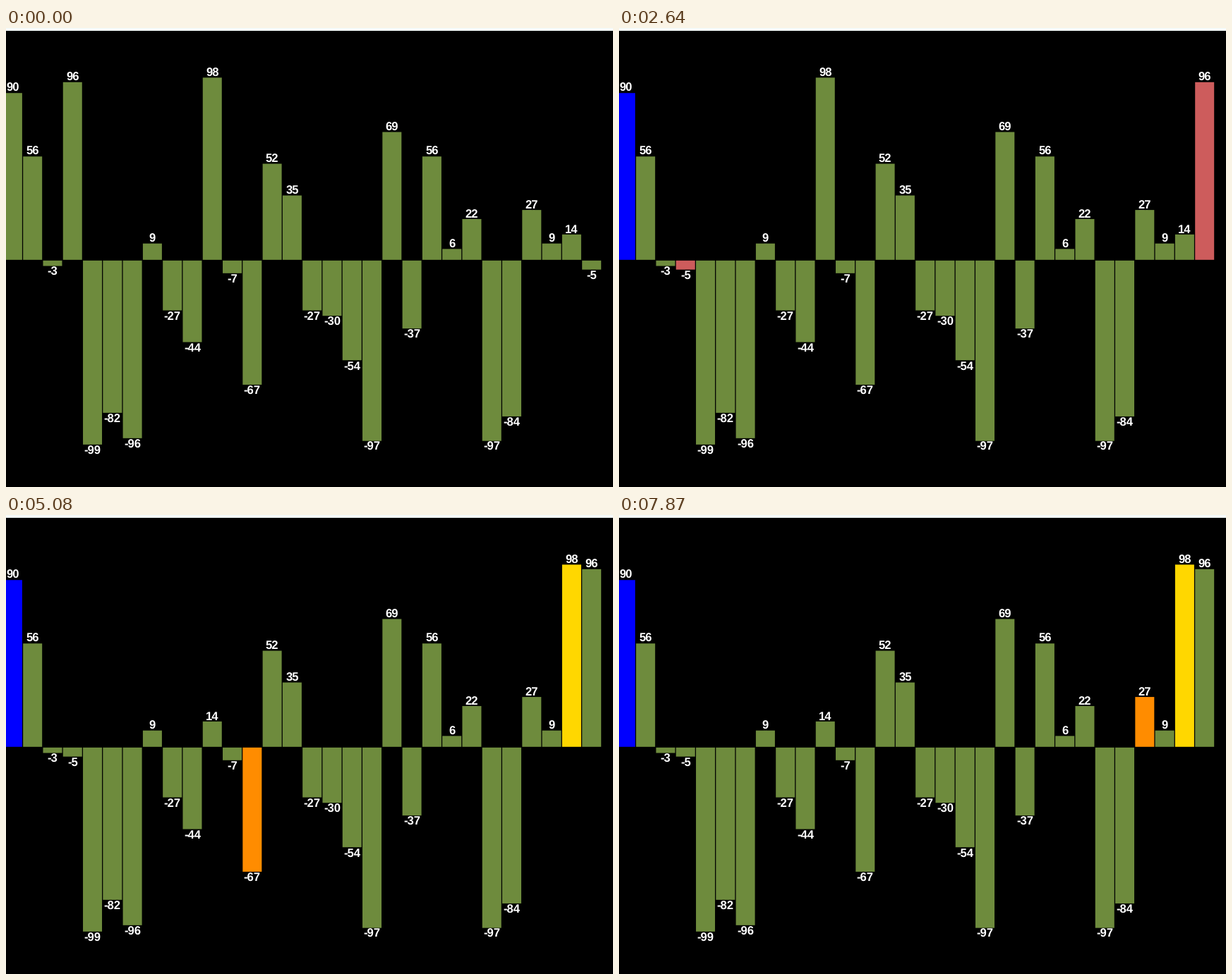
Recreate the animation shown at these times as a matplotlib script. Size 860 by 651 pixels, loop 8000 ms.

```python
from itertools import islice

import matplotlib.pyplot as plt
import numpy as np
from matplotlib.animation import FuncAnimation
from matplotlib.patches import Circle, Polygon, Rectangle

W, H, DPI = 860, 651, 100
LOOP, TICK = 8000, 20
STEPS = 32

GREEN, ORANGE, GOLD = "#6E8B3D", "#FF8C00", "#FFD700"
RED, BLUE = "#CD5C5C", "#0000FF"

VALUES = [90, 56, -3, 96, -99, -82, -96, 9, -27, -44,
          98, -7, -67, 52, 35, -27, -30, -54, -97, 69,
          -37, 56, 6, 22, -97, -84, 27, 9, 14, -5]

# The chart is laid out on a coarse grid: 22 cells per column, 1 cell of gap.
CELL = 9 / 7
PITCH, BAR_W, LEFT = 22 * CELL, 21 * CELL, -4.1
CELLS_PER_UNIT = 2.052
ABOVE, BELOW = 328.8, 329.8

plt.rcParams["text.hinting"] = "none"


def partition(values):
    """Yield (values, marked bars) for each step of a quicksort partition."""
    v = list(values)
    lo, hi = 0, len(v) - 1

    def scan():
        return list(v), {0: BLUE, hi: GOLD, lo: ORANGE}

    def swap():
        return list(v), {0: BLUE, lo: RED, hi: RED}

    while True:
        yield scan()
        while v[lo] <= v[0]:
            lo += 1
            yield scan()
        while v[hi] > v[0]:
            hi -= 1
            yield scan()
        if lo >= hi:
            return
        yield swap()
        v[lo], v[hi] = v[hi], v[lo]
        yield swap()
        lo += 1


states = [(VALUES, {})] + list(islice(partition(VALUES), STEPS))
# A steady beat that drags a little between the seventh and eleventh steps.
times = np.interp(np.arange(STEPS), [0, 6, 10, 31], [1630, 2840, 3690, 7870])
times = np.round(times, -1)

fig = plt.figure(figsize=(W / DPI, H / DPI), dpi=DPI, facecolor="black")
ax = fig.add_axes([0, 0, 1, 1])
ax.set_xlim(0, W)
ax.set_ylim(H, 0)
ax.axis("off")
ax.add_patch(Rectangle((0, 0), W, 4, fc="#F5FCFB", lw=0))

bars, labels = [], []
for i in range(len(VALUES)):
    x = LEFT + PITCH * i
    bars.append(ax.add_patch(Rectangle((x, ABOVE), BAR_W, 0, lw=0, snap=False)))
    labels.append(ax.text(x + BAR_W / 2, 0, "", color="white", ha="center",
                          va="baseline", family="Liberation Sans",
                          weight="bold", size=16.6 * 72 / DPI))

# Mouse pointer with its click highlight
TIP = np.array([737, 452])
click = ax.add_patch(Circle(TIP, 13.5, fc="#FFFF00", alpha=0.47, lw=0))
pointer = ax.add_patch(Polygon(TIP + [(0, 0), (0, 13), (3.5, 9), (9, 9)],
                               fc="white", lw=0))


def set_bar(bar, label, value, color):
    length = int(abs(value) * CELLS_PER_UNIT) * CELL
    if value > 0:
        base, edge = ABOVE, ABOVE - length
        middle = edge - 8
    else:
        base, edge = BELOW, BELOW + length
        middle = edge + 7.6
    bar.set_y(base)
    bar.set_height(edge - base)
    bar.set_facecolor(color)
    label.set_y(middle + 6)
    label.set_text(str(value))


def draw(frame):
    now = frame * TICK + TICK / 2
    values, marks = states[np.searchsorted(times, now, side="right")]
    for i, (bar, label) in enumerate(zip(bars, labels)):
        set_bar(bar, label, values[i], marks.get(i, GREEN))
    pointer.set_visible(500 <= now < 830)
    click.set_visible(770 <= now < 830)
    return bars + labels + [click, pointer]


anim = FuncAnimation(fig, draw, frames=LOOP // TICK, interval=TICK,
                     repeat=True, repeat_delay=0, blit=False)
plt.show()
```
